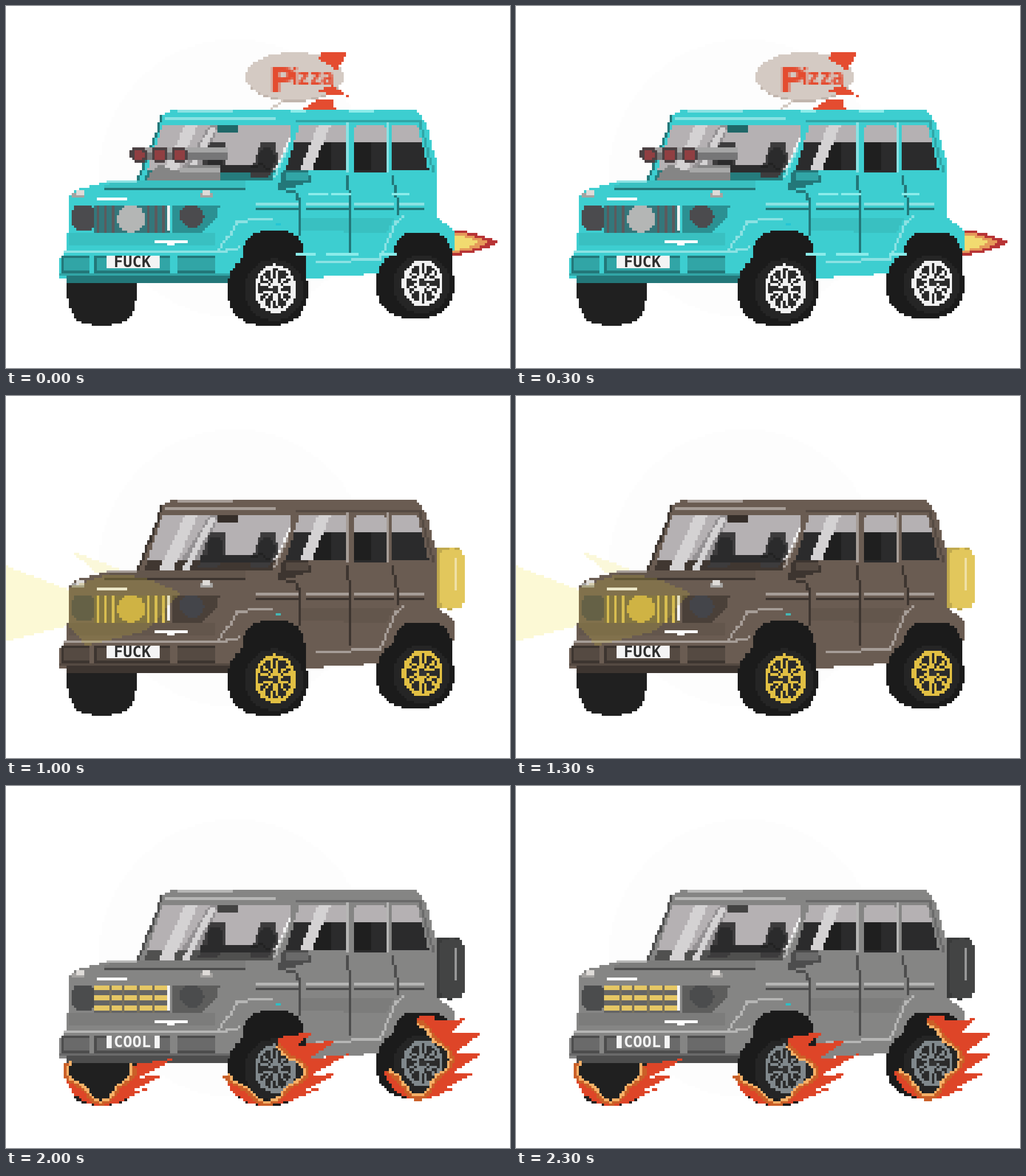
Recreate the animation shown at these times as an HTML page with a canvas. Size 882 by 635 pixels, loop 2.5 s.

```html
<!DOCTYPE html>
<html lang="en">
<head>
<meta charset="utf-8">
<title>Custom cars</title>
<style>
html, body { margin: 0; width: 100%; height: 100%; overflow: hidden; background: #fff; }
canvas { display: block; }
</style>
</head>
<body>
<canvas id="stage" width="882" height="635"></canvas>
<script>
const view = document.getElementById('stage').getContext('2d');
const art = document.createElement('canvas');
art.width = 200;
art.height = 144;
const ctx = art.getContext('2d');
const CELL = 4.41, TOP = 1.3, STEP = 500;

// Shapes are given in stage pixels and snap to the coarse grid.
const gx = x => Math.round(x / CELL);
const gy = y => Math.round((y - TOP) / CELL);
const points = s => typeof s === 'string' ? s.split(' ').map(p => p.split(',').map(Number)) : s;
const range = (n, f) => Array.from({ length: n }, (_, i) => f(i));
const rand = i => { const s = Math.sin(i * 12.9898) * 43758.5453; return s - Math.floor(s); };

function tone(hex, t) {
  const to = t < 0 ? 0 : 255, k = Math.abs(t);
  const c = [1, 3, 5].map(i => Math.round(parseInt(hex.slice(i, i + 2), 16) * (1 - k) + to * k));
  return `rgb(${c})`;
}

function rect(c, x, y, w, h) {
  ctx.fillStyle = c;
  const a = gx(x), b = gy(y);
  ctx.fillRect(a, b, Math.max(1, gx(x + w) - a), Math.max(1, gy(y + h) - b));
}

function poly(c, s, from = 0) {
  const p = points(s);
  ctx.fillStyle = c;
  for (let row = Math.max(0, gy(from)); row < art.height; row++) {
    const y = (row + .5) * CELL + TOP, hits = [];
    p.forEach(([x1, y1], i) => {
      const [x2, y2] = p[(i + 1) % p.length];
      if (y1 <= y !== y2 <= y) hits.push(x1 + (y - y1) / (y2 - y1) * (x2 - x1));
    });
    hits.sort((a, b) => a - b);
    for (let i = 0; i + 1 < hits.length; i += 2) {
      const a = gx(hits[i]);
      ctx.fillRect(a, row, gx(hits[i + 1]) - a, 1);
    }
  }
}

function line(c, s, w = 1) {
  const p = points(s);
  ctx.fillStyle = c;
  for (let i = 0; i + 1 < p.length; i++) {
    const [[x1, y1], [x2, y2]] = [p[i], p[i + 1]];
    const n = Math.ceil(Math.max(Math.abs(x2 - x1), Math.abs(y2 - y1)) / CELL) || 1;
    for (let k = 0; k <= n; k++) {
      const x = x1 + (x2 - x1) * k / n, y = y1 + (y2 - y1) * k / n;
      ctx.fillRect(Math.floor(x / CELL), Math.floor((y - TOP) / CELL), w, w);
    }
  }
}

// Superellipse: a higher power gives squarer corners.
function oval(c, x, y, rx, ry = rx, power = 2) {
  const bend = v => Math.sign(v) * Math.abs(v) ** (2 / power);
  poly(c, range(48, i => {
    const a = i * Math.PI / 24;
    return [x + rx * bend(Math.cos(a)), y + ry * bend(Math.sin(a))];
  }));
}

function write(text, x, y, size, c, font) {
  ctx.save();
  ctx.scale(1 / CELL, 1 / CELL);
  ctx.font = `bold ${size}px ${font}`;
  ctx.fillStyle = c;
  ctx.fillText(text, x, y);
  ctx.restore();
}

function hub(x, y, rx, ry, v) {
  if (v.cap) {
    oval('#a3a2a1', x, y, rx, ry);
    for (const i of [0, 2, 4]) {
      const at = a => [x + rx * Math.cos(a), y + ry * Math.sin(a)];
      poly(i === 2 ? '#8d8c8b' : '#c8c7c6', [[x, y], at(i * 1.3 + .6), at(i * 1.3 + 1.1), at(i * 1.3 + 1.6)]);
    }
    return;
  }
  oval(v.rim, x, y, rx, ry);
  oval('#2b2b2b', x, y, rx - 7, ry - 7);
  for (let i = 0; i < 12; i++) {
    const a = (Math.floor(i / 2) + .5) * Math.PI / 3 + (i % 2 ? .2 : -.2);
    const at = k => [x + (rx - 4) * k * Math.cos(a), y + (ry - 4) * k * Math.sin(a)];
    line(v.rim, [at(.25), at(1)]);
  }
  oval('#333', x, y, 6);
}

function wheel(archX, archY, archR, x, y, r, ry, v) {
  oval('#1b1b1b', archX, archY, archR, archR + 10, 3);
  oval('#1b1b1b', x, y, r, ry, 2.4);
  oval('#252525', x + 11, y, r - 18, ry - 9);
  hub(x + 13, y - 2, r * .52, ry * .68, v);
}

function glass(v) {
  const pane = '#b5b1b3', shine = '#d4d2d3', dark = '#2b2b2c';
  const front = '275,208 497,208 497,235 465,304 243,304';
  poly(pane, front);
  poly(tone(v.main, -.4), front, 288);
  poly('#949193', '358,208 372,208 340,290 305,290');
  poly(shine, '314,208 336,208 293,304 268,304');
  poly(shine, '357,212 369,212 320,304 308,304');
  for (const x of [370, 460]) {
    poly('#3d3c3d', [[x - 14, 240], [x + 12, 240], [x + 16, 275], [x, 300], [x - 34, 300]]);
    oval(dark, x - 4, 268, 15, 20);
  }
  rect(dark, 340, 278, 122, 14);
  rect(tone(v.main, -.5), 371, 208, 34, 13);
  line('#222', '430,283 445,276 460,287');
  const sides = ['513,208 595,208 595,290 490,287', '611,208 660,208 665,215 665,291 608,291', '677,208 720,208 740,289 674,287'];
  for (const s of sides) {
    poly(pane, s);
    poly(dark, s, 240);
  }
  for (const x of [538, 609]) rect('#1f1f1f', x, 240, 30, 50);
  poly(shine, '546,208 568,208 536,287 515,287');
}

function grille(v) {
  rect(v.grille, 153, 348, 135, 49);
  if (v.bars) {
    for (let i = 0; i < 3; i++) rect('#e5c765', 155, 350 + i * 18, 128, 8);
    for (let i = 1; i < 5; i++) rect('#77715f', 155 + i * 25, 350, 3, 47);
  } else {
    if (v.slat) for (let i = 0; i < 6; i++) rect(v.slat, 160 + i * 13 + (i > 2 ? 48 : 0), 349, 5, 48);
    oval(v.badge, 219, 373, 24);
  }
  line('#f4f4f4', '285,350 285,391');
}

function body(v) {
  const { main } = v;
  const soft = tone(main, -.07), shade = tone(main, -.2), deep = tone(main, -.42), hi = tone(main, .4);
  oval('#202020', 168, 486, 61, 74, 3);
  poly(main, '275,190 290,182 717,182 735,205 752,268 756,372 230,372 230,305 270,205');
  poly(main, '111,335 120,323 185,307 756,307 756,372 783,392 783,428 672,468 545,476 94,476 94,445 107,422');
  rect(deep, 105, 475, 300, 10);
  line(deep, '272,194 268,210 232,304');
  line(hi, '279,197 470,197');
  line(hi, '300,184 395,184');
  line(shade, '508,204 724,204 748,288');
  poly(soft, '515,372 680,372 664,400 517,392');
  rect(soft, 111, 399, 255, 22);
  glass(v);
  for (const x of [599, 669]) line(hi, [[x, 208], [x, 262], [x - 3, 292]]);
  line('#f2f2f2', '497,232 476,280');
  line(hi, '492,250 470,298');

  // bonnet
  poly(soft, '168,320 186,307 418,307 418,320');
  line(deep, '172,319 418,319');
  line(hi, '178,309 226,309');
  for (const x of [128, 350]) {
    rect('#a5a3a1', x - 12, 327, 22, 10);
    rect('#dedbd8', x - 6, 323, 14, 9);
  }
  line('#fff', '160,338 183,338');
  line('#fff', '189,338 209,338');

  // doors and trim
  line(deep, '478,320 508,328 515,345 515,400');
  line(deep, '596,300 603,345 603,437');
  line(deep, '676,300 686,345 686,365');
  for (const [x, w] of [[437, 76], [523, 75], [608, 73], [688, 43]]) {
    rect(hi, x, 346, w, 5);
    rect(deep, x, 354, w, 4);
  }
  poly(deep, '484,290 530,290 534,308 515,314 475,325');
  rect(shade, 488, 292, 42, 13);
  line(hi, '543,450 655,444 682,380 695,369');
  line(hi, '372,425 388,407 405,378 466,372');
  rect(v.dot, 471, 379, 10, 6);

  // front end
  grille(v);
  poly(tone(main, -.3), '290,348 375,348 368,372 345,396 290,397');
  oval(v.lamp, 135, 371, 19, 22, 4);
  oval(v.lamp, 325, 369, 22, 21, 1.6);
  line('#fff', '261,415 300,415');
  line('#fff', '283,419 316,412');
  line(hi, '104,430 384,430 408,424');
  line(shade, '96,471 404,471');
  for (const [x, w] of [[98, 48], [155, 133], [298, 70]]) {
    rect(deep, x, 436, w, 31);
    rect(shade, x + 4, 442, w - 4, 22);
  }
  rect('#f4f4f4', 177, 437, 90, 23);
  if (v.plateBg) rect(v.plateBg, 187, 437, 75, 23);
}

function exhaust(colors) {
  colors.forEach((c, k) => {
    const size = 1 - k * .2;
    const edge = side => range(11, i => {
      const u = i / 10;
      return [777 + 86 * size * u, 415 + side * 22 * size * (1 - u * u)];
    });
    poly(c, [...edge(-1), ...edge(1).reverse()]);
  });
}

function spare(c) {
  oval(tone(c, -.15), 775, 320, 27, 54, 5);
  oval(c, 780, 320, 22, 52, 5);
  rect(tone(c, .45), 787, 283, 4, 60);
}

function chromeSpare() {
  for (let y = 266; y < 372; y += CELL) {
    const g = Math.round(150 + 70 * Math.cos((y - 280) / 11.5));
    rect(Math.abs(y - 312) < 6 ? '#242424' : `rgb(${g},${g},${g})`, 752, y, 50, 5);
  }
}

function beams() {
  poly('#fcf9d5', '0,298 112,341 112,402 0,430');
  poly('#fbf8da', '112,271 205,306 168,318');
}

function glow(c) {
  poly(c, '111,335 180,312 240,318 306,345 245,412 140,438 108,400');
}

function blower() {
  rect('#767677', 238, 248, 150, 24);
  rect('#a5a5a5', 238, 249, 150, 6);
  for (const x of [232, 269, 304]) {
    oval('#4b4143', x, 261, 14, 12, 4);
    oval('#903f42', x, 261, 9, 8, 4);
  }
  poly('#858585', '245,304 268,277 295,290 325,278 376,278 376,304');
  rect('#a8a8a8', 305, 282, 70, 9);
}

function rocket() {
  const red = '#e44c30', font = '"DejaVu Sans", sans-serif';
  line('#d3c9c1', '465,178 484,168');
  oval('#c1b5ad', 505, 126, 84, 42);
  oval('#d4cac3', 505, 123, 86, 42);
  poly(red, '553,81 598,81 579,112 548,94');
  poly(red, '540,151 572,139 598,158');
  poly(red, '520,181 546,164 570,164 578,181');
  write('P', 461, 148, 62, red, font);
  write('izza', 499, 138, 35, red, font);
}

function lightBar() {
  rect('#333', 280, 186, 235, 6);
  for (const [c, r] of [['#333', 13], ['#fff', 9]])
    for (let i = 0; i < 9; i++) oval(c, 287 + i * 26.35, 177, r);
}

function flag() {
  line('#222', '684,180 686,160 725,79');
  const edge = f => range(13, i => {
    const u = i / 12;
    return [726 - 28 * f + 93 * u, 76 + 74 * f + 48 * u - 4 * Math.sin(u * 6.3)];
  });
  ['#394f9e', '#f0f1f2', '#394f9e'].forEach((c, i) =>
    poly(c, [...edge(i / 3), ...edge((i + 1) / 3).reverse()]));
  oval('#568c6d', 762, 137, 13);
  oval('#e3c17b', 763, 134, 9);
  oval('#e9eef0', 763, 136, 6);
}

function paint() {
  const gold = '#edbc43', font = '"DejaVu Sans Mono", monospace';
  for (let i = 0; i < 10; i++) {
    const a = i * Math.PI / 5 - Math.PI / 2, at = r => [642 + r * Math.cos(a), 327 + r * Math.sin(a)];
    line(gold, [at(21), at(28)]);
  }
  oval(gold, 642, 327, 15);
  for (const [c, d] of [['#1d489c', 4], ['#2b69df', 0]]) {
    write('GM', 545 + d, 434 + d, 95, c, font);
    for (let i = 0; i < 5; i++) rect(c, 560 + i * 21 + d, 420, 8, 14 + 12 * rand(i + 2) + d);
  }
}

// A burning crescent: tongues blow to the right, the inner edge waves.
function fire(x, y, rx, ry, from, to, reach) {
  const n = 9, at = (a, k) => [x + rx * k * Math.cos(a), y + ry * k * Math.sin(a)];
  const outer = range(n * 2 + 1, i => {
    const a = from + (to - from) * i / n / 2, p = at(a, 1);
    const blow = i % 2 * reach * Math.max(0, Math.cos(a)) * (.6 + .6 * rand(i));
    return [p[0] + blow, p[1] - blow * .35];
  });
  const inner = shift => range(25, i => {
    const u = i / 24, a = from + (to - from) * u;
    return at(a, .68 + shift + .12 * Math.cos(a * 4) + .14 * u);
  });
  poly('#de4528', [...outer, ...inner(0).reverse()]);
  poly('#ca6028', [...inner(.12), ...inner(0).reverse()]);
  line('#f8b167', inner(0));
}

const CARS = [
  { main: '#3dced0', dot: '#25c6d4', grille: '#34777b', slat: '#5b5a5d', badge: '#b4b6b5', lamp: '#4b4b4e', rim: '#f1f1f1', plate: 'FUCK',
    back() { exhaust(['#b83435', '#e59a5a', '#f1db70']); },
    front() {
      blower();
      rocket();
      for (let i = 0; i < 12; i++) {
        const x = 500 + 190 * rand(i);
        line('#8becea', [[x, [185, 328, 437][i % 3]], [x + 15 + 15 * rand(i + 9), [185, 328, 437][i % 3]]]);
      }
    } },
  { main: '#3d403f', dot: '#26c5ce', grille: '#303131', slat: '#626364', badge: '#a6a7a7', lamp: '#4a4a4b', rim: '#c6c6c6', plate: 'FUCK',
    back() {
      exhaust(['#2551bd', '#49a9dc', '#79d3ed']);
      chromeSpare();
    },
    front: lightBar },
  { main: '#6a5c52', dot: '#45b7b5', grille: '#706443', slat: '#e1c558', badge: '#d6b746', lamp: '#44454a', rim: '#e1bf43', plate: 'FUCK',
    back() {
      beams();
      spare('#e2c75c');
    },
    front() { glow('rgba(186,168,62,.28)'); } },
  { main: '#ac9a81', dot: '#4296c9', grille: '#85816a', badge: '#b6b39a', lamp: '#f8ed86', cap: true, plate: 'ETH',
    back: beams,
    front() {
      glow('rgba(205,195,95,.2)');
      flag();
      paint();
    } },
  { main: '#858584', dot: '#2ebec5', grille: '#656565', bars: true, lamp: '#4b4c4d', rim: '#80888c', plate: 'COOL', plateBg: '#808080',
    back() { spare('#434444'); },
    front() {
      fire(458, 500, 76, 61, -1.3, 3, 75);
      fire(722, 478, 64, 73, -1.6, 2.8, 65);
      fire(168, 500, 65, 61, -.2, 3.4, 55);
    } }
];

function draw(v) {
  ctx.fillStyle = '#fff';
  ctx.fillRect(0, 0, art.width, art.height);
  oval('#fdfdfd', 400, 302, 238, 244);
  v.back();
  body(v);
  wheel(468, 460, 56, 458, 498, 70, 63, v);
  wheel(729, 458, 52, 716, 488, 68, 60, v);
  v.front();

  view.fillStyle = '#fff';
  view.fillRect(0, 0, 882, 635);
  view.imageSmoothingEnabled = false;
  view.drawImage(art, 0, TOP, 882, 635);
  view.font = 'bold 27px "DejaVu Sans Mono", monospace';
  view.textAlign = 'center';
  view.fillStyle = v.plateBg ? '#f4f4f4' : '#303030';
  view.fillText(v.plate, 221, 458);
}

let shown = -1;
function tick() {
  const i = Math.floor(performance.now() / STEP) % CARS.length;
  if (i !== shown) draw(CARS[shown = i]);
  requestAnimationFrame(tick);
}
tick();
</script>
</body>
</html>
```
